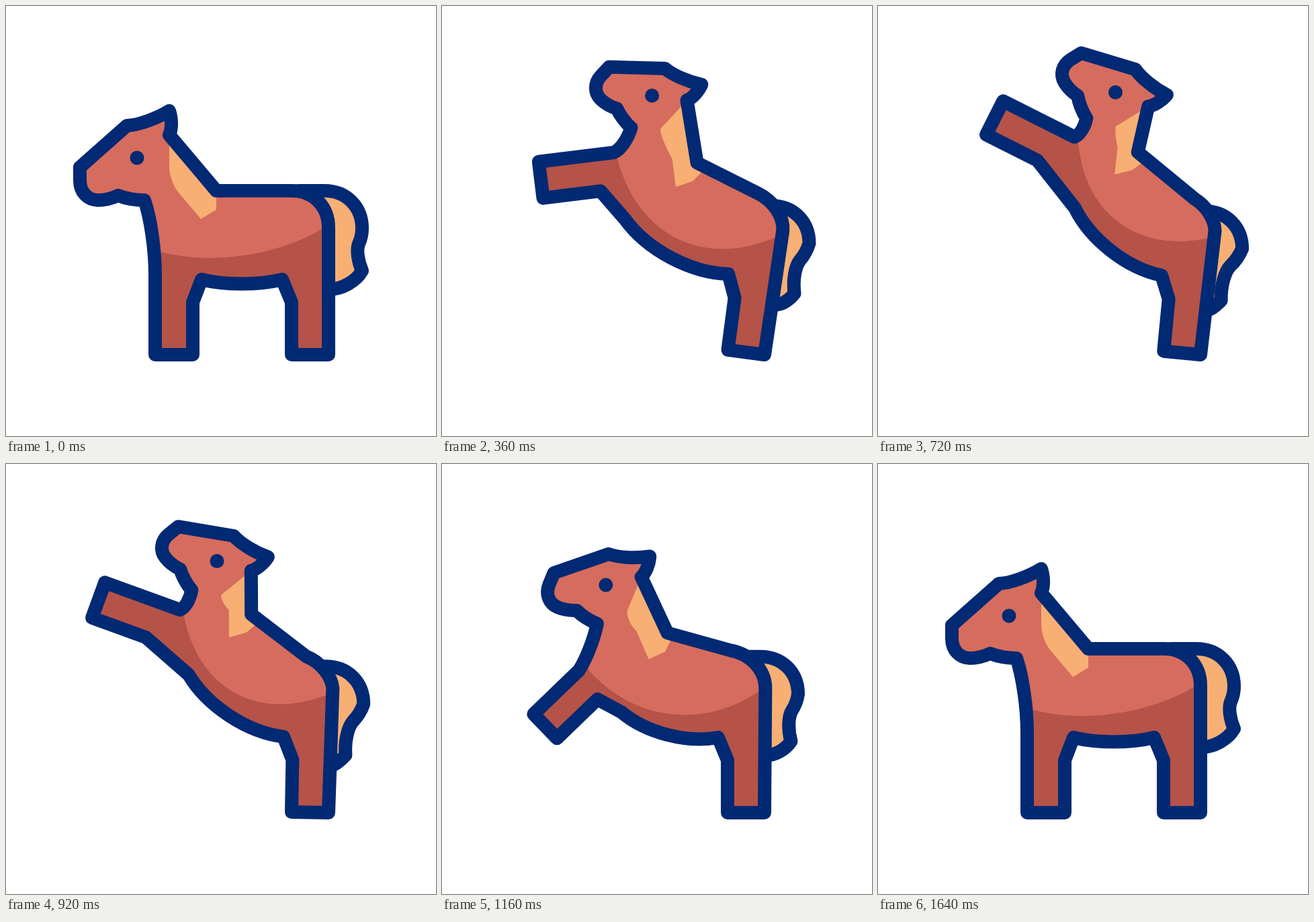
Animation of 640x640 px, one loop 2 s. Source, as an HTML page with a canvas:

```html
<!DOCTYPE html>
<html lang="en">
<head>
<meta charset="utf-8">
<title>Rearing horse</title>
<style>
  html, body { margin: 0; width: 100%; height: 100%; overflow: hidden; background: #fff; }
  canvas { display: block; }
</style>
</head>
<body>
<canvas id="stage" width="640" height="640"></canvas>
<script>
const ctx = document.getElementById('stage').getContext('2d');
const NAVY = '#022973', COAT = '#d66c5e', SHADE = '#b55348', TAN = '#f7af73';
const LOOP = 2000, STEP = 40, ROUND = 0.58, RAD = Math.PI / 180;

const add = ([x, y], [dx, dy]) => [x + dx, y + dy];
const sub = ([x, y], [dx, dy]) => [x - dx, y - dy];
const turn = ([x, y], deg, scale = 1) => {
  const c = Math.cos(deg * RAD) * scale, s = Math.sin(deg * RAD) * scale;
  return [x * c - y * s, x * s + y * c];
};
// A point beside the middle of a line, at a distance from it.
const beside = (a, b, distance) => {
  const [dx, dy] = sub(b, a), k = distance / Math.hypot(dx, dy);
  return [(a[0] + b[0]) / 2 - dy * k, (a[1] + b[1]) / 2 + dx * k];
};

// Outline of the head from the ear round to the jaw, measured from its crown.
const HEAD = [[63, 14], [70, -1], [63, -22], [28, -1], [0, 0], [-70, 62], [-70, 82],
  [-70, 111], [-43, 111], [-28, 111], [-13, 104], [6, 112], [26, 111]];
const EYE = [15, 48];
const HOOF = [480, 519];

// time, lean of hind leg, tilt of head, kick of foreleg (degrees), crown x y, elbow x y
const rest = [0, 0, 0, 180, 178, 222, 400];
const peak = [7.5, 60, 118, 395, 91, 302, 190];
const keys = [
  [0, ...rest],
  [160, 2, 14, 25, 224, 144, 216, 342],
  [360, 7.5, 43, 83, 332, 93, 256, 218],
  [520, ...peak],
  [590, ...peak],
  [920, 1, 51, 110, 339, 107, 259, 217],
  [1160, 0, 22.5, 46, 248, 134, 204, 307],
  [1640, ...rest]
];

// Monotone cubic through the keys: no overshoot, flat at turning points.
function slope(k, i) {
  if (k === 0 || k === keys.length - 1) return 0;
  const [a, b, c] = keys.slice(k - 1, k + 2);
  const h0 = b[0] - a[0], h1 = c[0] - b[0];
  const d0 = (b[i] - a[i]) / h0, d1 = (c[i] - b[i]) / h1;
  if (d0 * d1 <= 0) return 0;
  return 3 * (h0 + h1) / ((2 * h1 + h0) / d0 + (h1 + 2 * h0) / d1);
}

function motionAt(time) {
  const t = Math.min(time, 1640);
  let k = 0;
  while (k < keys.length - 2 && t >= keys[k + 1][0]) k++;
  const a = keys[k], b = keys[k + 1];
  const h = b[0] - a[0], u = (t - a[0]) / h, v = 1 - u;
  return rest.map((_, n) => {
    const i = n + 1;
    return v * v * (1 + 2 * u) * a[i] + u * u * (3 - 2 * u) * b[i] +
      h * u * v * (v * slope(k, i) - u * slope(k + 1, i));
  });
}

function poseAt(time) {
  const [lean, tilt, kick, crownX, crownY, elbowX, elbowY] = motionAt(time);
  const reach = Math.sin(kick * RAD), reach2 = reach * reach;
  const bend = Math.max(0, Math.sin(2 * kick * RAD));
  const rear = tilt / 60;

  const onHead = p => add([crownX, crownY], turn(p, tilt, 1 - 0.11 * reach));
  const head = HEAD.map(onHead);
  const ear = head[0], jaw = head[12];

  // The hind leg turns about its back hoof.
  const onHind = p => add(HOOF, turn(sub(p, HOOF), lean));
  const bellyEnd = onHind([411, 407]);
  const hip = add(onHind([480, 330]), [3.6 * rear, 4.2 * rear]);
  const rump = add(onHind([480, 275]), [-2 * rear, 30 * rear]);
  const back = add(onHind([426, 275]), [23 * rear * rear, 17 * rear * rear]);
  const withers = add(hip, turn([-167, -55], 0.47 * tilt, 1 - 0.074 * reach));

  // The foreleg is a block that swings from the elbow.
  const elbow = [elbowX, elbowY];
  const toe = add(elbow, turn([0, 119 - 25 * bend], kick));
  const heel = add(toe, turn([56 - 6 * bend, 0], kick));
  const armpit = add(heel, turn([0, -78 - 8 * reach], kick));
  const throat = add(beside(jaw, elbow, 0), [8 - 4 * reach, -9 + 20 * reach]);
  const belly = add(bellyEnd, turn([-120 - 55 * reach2, 0], 0.65 * tilt));

  const underside = [elbow, toe, heel, armpit, belly,
    beside(belly, bellyEnd, 15 + 28 * reach), bellyEnd,
    onHind([425, 441]), onHind([425, 519]), HOOF, hip];

  const shadeStart = add(elbow, [5, -35 + 45 * reach2]);
  const shadeEnd = add(hip, [-2, -3 + 12 * rear]);
  const shade = [shadeStart, ...underside, shadeEnd,
    beside(shadeStart, shadeEnd, 58 + 105 * reach), shadeStart];

  // The mane hangs between the ear and the withers.
  const onWithers = (p, scale) => add(withers, turn(p, 0.3 * tilt, scale));
  const fringe = add(ear, turn([0, 48], tilt, 1 + 0.2 * reach));
  const mane = [ear, fringe, add(fringe, [-3 * rear, 22 - 17 * rear]),
    onWithers([-55, 4], 1 - 0.45 * rear), onWithers([-23, 42]), onWithers([0, 28]),
    add(withers, [12 * rear, 12]), withers];

  // The upper tail only shifts; its lower part swings inwards.
  const bend0 = [530 + 2.2 * lean, 331 + 31 * rear];
  const onTail = (x, y) => add(bend0, [x, y]);
  const swing = (x, y) => add(bend0, turn([x, y], 0.38 * tilt, 1 + 0.33 * rear));
  const tail = [onTail(-94, -56), onTail(-56, -56), onTail(0, -56), bend0,
    swing(0, 12), swing(-5, 23), swing(-11, 38), swing(0, 63),
    add(swing(0, 63), [-15, 27 - 12 * rear]), onTail(-50, 91)];

  return {
    body: [...head, throat, ...underside, rump, back, withers],
    shade, mane, tail, eye: onHead(EYE)
  };
}

// M = move, L = line, R = rounded turn given by its corner and its end.
function trace(ops, points) {
  let n = 0, from;
  ctx.beginPath();
  for (const op of ops) {
    if (op === 'R') {
      const corner = points[n++], to = points[n];
      const toward = p => add(p, turn(sub(corner, p), 0, ROUND));
      ctx.bezierCurveTo(...toward(from), ...toward(to), ...to);
    } else if (op === 'L') ctx.lineTo(...points[n]);
    else ctx.moveTo(...points[n]);
    from = points[n++];
  }
}

function fill(color) {
  ctx.fillStyle = color;
  ctx.fill();
}

function draw(time) {
  const { body, shade, mane, tail, eye } = poseAt(time);
  const bodyOps = 'MRRLLRRRRLLLLRLLLLRL';

  ctx.fillStyle = '#fff';
  ctx.fillRect(0, 0, 640, 640);
  ctx.strokeStyle = NAVY;
  ctx.lineWidth = 20;
  ctx.lineJoin = ctx.lineCap = 'round';

  trace('MLRRRR', tail);
  fill(TAN);
  ctx.stroke();

  trace(bodyOps, body);
  fill(COAT);
  trace('MLLLLLRLLLLLR', shade);
  fill(SHADE);
  trace('MLRLLLL', mane);
  fill(TAN);

  trace(bodyOps, body);
  ctx.closePath();
  ctx.stroke();

  ctx.beginPath();
  ctx.arc(...eye, 10.5, 0, 2 * Math.PI);
  fill(NAVY);
}

const start = performance.now();
function tick() {
  const time = (performance.now() - start) % LOOP;
  draw(Math.floor(time / STEP) * STEP);
  requestAnimationFrame(tick);
}
tick();
</script>
</body>
</html>
```
